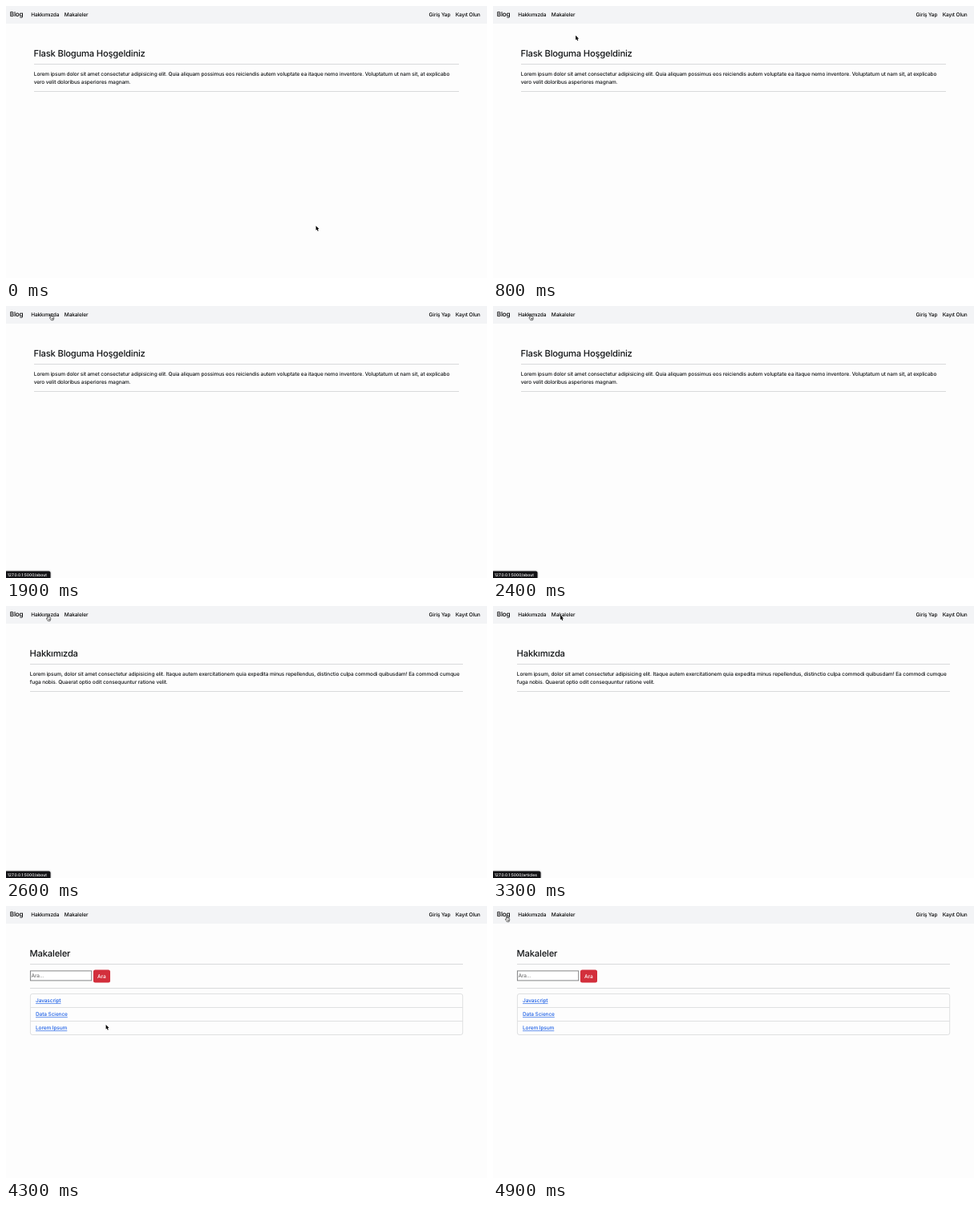
Recreate the animation shown at these times as an HTML page. Size 600 px wide and 339 px high, loop 5 s.

```html
<!DOCTYPE html>
<html lang="tr">
<head>
<meta charset="utf-8">
<title>Flask Blog</title>
<style>
  html, body { margin: 0; width: 100%; height: 100%; overflow: hidden; background: #fdfdfd; }
  svg { display: block; width: 600px; height: 339px; }
  text {
    font: 500 6.5px Inter, "Open Sans", sans-serif; letter-spacing: -.0143em;
    text-rendering: geometricPrecision; fill: #050506; white-space: pre;
  }
  .brand { font-size: 8.1px; letter-spacing: -.02em; }
  .title { font-size: 11.2px; letter-spacing: -.0171em; fill: #121416; }
  .body { fill: #121416; }
  .link { fill: #1a5ee6; text-decoration: underline; }
  .hint { fill: #757575; }
  .light { fill: #fff; }
  .rule { stroke: #d9dadb; }
  .frame { fill: none; stroke: #dfe0e1; }
  .status text { font-size: 5px; letter-spacing: 0; fill: #fff; }
  .status path { fill: #111114; filter: drop-shadow(0 0 1px #0006); }

  .page, .status { visibility: hidden; animation: 5s step-end infinite; }
  #home { animation-name: home; }
  #about { animation-name: about; }
  #articles { animation-name: articles; }
  #urlHome { animation-name: urlHome; }
  #urlAbout { animation-name: urlAbout; }
  #urlArticles { animation-name: urlArticles; }
  @keyframes home { 0% { visibility: visible } 52%, 100% { visibility: hidden } }
  @keyframes about { 52% { visibility: visible } 68%, 100% { visibility: hidden } }
  @keyframes articles { 68%, 100% { visibility: visible } }
  @keyframes urlHome { 32% { visibility: visible } 36%, 100% { visibility: hidden } }
  @keyframes urlAbout { 36% { visibility: visible } 58%, 100% { visibility: hidden } }
  @keyframes urlArticles { 58% { visibility: visible } 82%, 100% { visibility: hidden } }
</style>
</head>
<body>
<svg viewBox="0 0 600 339">
  <rect width="600" height="339" fill="#fdfdfd"/>
  <rect width="600" height="22" fill="#f3f4f6"/>
  <text class="brand" x="4.8" y="13.2">Blog</text>
  <text x="31.2" y="12.6">Hakkımızda</text>
  <text x="72.8" y="12.6">Makaleler</text>
  <text x="527.6" y="12.6">Giriş Yap</text>
  <text x="560.7" y="12.6">Kayıt Olun</text>

  <g class="page" id="home">
    <text class="title" x="34.6" y="63.2">Flask Bloguma Hoşgeldiniz</text>
    <path class="rule" d="M35 72.5H565M35 106.5H565"/>
    <text class="body" x="34.8" y="87">Lorem ipsum dolor sit amet consectetur adipisicing elit. Quia aliquam possimus eos reiciendis autem voluptate ea itaque nemo inventore. Voluptatum ut nam sit, at explicabo</text>
    <text class="body" x="34.8" y="97">vero velit doloribus asperiores magnam.</text>
  </g>

  <g class="page" id="about">
    <text class="title" x="29.6" y="63.2">Hakkımızda</text>
    <path class="rule" d="M30 72.5H570M30 106.5H570"/>
    <text class="body" x="29.8" y="87">Lorem ipsum, dolor sit amet consectetur adipisicing elit. Itaque autem exercitationem quia expedita minus repellendus, distinctio culpa commodi quibusdam! Ea commodi cumque</text>
    <text class="body" x="29.8" y="97">fuga nobis. Quaerat optio odit consequuntur ratione velit.</text>
  </g>

  <g class="page" id="articles">
    <text class="title" x="29.6" y="63.2">Makaleler</text>
    <path class="rule" d="M30 72.5H570M30 102.5H570"/>
    <rect x="30.4" y="80.9" width="76.3" height="12" fill="#fff" stroke="#77787a" stroke-width=".9"/>
    <text class="hint" x="31.4" y="89.4">Ara...</text>
    <rect x="108.9" y="79.6" width="21.1" height="15.8" rx="2.5" fill="#d32f3c"/>
    <text class="light" x="114" y="89.8">Ara</text>
    <rect class="frame" x="30.4" y="109.5" width="539.3" height="51" rx="2.5"/>
    <path class="frame" d="M30 126.5H570M30 143.5H570"/>
    <text class="link" x="37" y="120.4">Javascript</text>
    <text class="link" x="37" y="137.4">Data Science</text>
    <text class="link" x="37" y="154.4">Lorem Ipsum</text>
  </g>

  <g class="status" id="urlHome">
    <path d="M0 330.5H37.5Q39.5 330.5 39.5 332.5V339H0Z"/>
    <text x="1.8" y="336.7">127.0.0.1:5000</text>
  </g>
  <g class="status" id="urlAbout">
    <path d="M0 330.5H53.5Q55.5 330.5 55.5 332.5V339H0Z"/>
    <text x="1.8" y="336.7">127.0.0.1:5000/about</text>
  </g>
  <g class="status" id="urlArticles">
    <path d="M0 330.5H57.5Q59.5 330.5 59.5 332.5V339H0Z"/>
    <text x="1.8" y="336.7">127.0.0.1:5000/articles</text>
  </g>

  <g id="cursor">
    <path id="arrow" d="M-.4 .1V5.6L.8 4.5L1.7 6.6L2.8 6.2L1.9 4.1H3.6Z" fill="#000" stroke="#fff" stroke-width=".4" paint-order="stroke"/>
    <path id="hand" d="M1.6 4.6V1Q1.6 .3 2.1 .3T2.7 1V3Q3.3 2.6 3.7 3.2Q4.3 2.8 4.7 3.4Q5.7 3.1 5.7 4.2V5.6Q5.6 6.6 5 7.7H2.3Q1.7 6.5 .5 5Q.2 4.2 1 4.2ZM3.1 5V6.5M4 5V6.5M4.8 5V6.5"
      fill="#fff" stroke="#000" stroke-width=".55" stroke-linejoin="round"/>
  </g>
</svg>
<script>
  const LOOP = 5000, STEP = 100;
  // time, x, y, pointer shape from that time on
  const stops = [
    [0, 387, 274, 'arrow'], [300, 277, 118, 'arrow'], [500, 277, 118, 'arrow'],
    [1000, 36, 5, 'arrow'], [1100, 25, 8, 'arrow'], [1200, 19, 9, 'hand'],
    [1400, 16.5, 9.8, 'hand'], [1600, 18, 10, 'hand'], [1700, 34, 9, 'hand'],
    [1900, 54, 10, 'hand'], [2000, 55.5, 10, 'hand'], [2300, 31.5, 8.5, 'hand'],
    [2400, 44.5, 10, 'hand'], [2500, 44.5, 10, 'hand'], [2600, 50, 11, 'hand'],
    [3100, 81.5, 11.5, 'hand'], [3200, 81.5, 11.5, 'hand'], [3300, 84.5, 11.5, 'arrow'],
    [3500, 82, 12, 'hand'], [3700, 82, 12, 'hand'], [3800, 82, 16, 'hand'],
    [3900, 88, 34, 'arrow'], [4300, 125, 148, 'arrow'], [4800, 16, 14, 'hand'],
    [4900, 15, 12, 'hand'], [5000, 15, 12, 'hand']
  ];
  const get = id => document.getElementById(id);
  const cursor = get('cursor'), shapes = { arrow: get('arrow'), hand: get('hand') };
  const ease = k => k * (1.5 - k / 2);

  function draw(now) {
    const t = Math.floor(now % LOOP / STEP) * STEP;
    const i = stops.findIndex((s, n) => n && t < s[0]);
    const [t0, x0, y0, kind] = stops[i - 1], [t1, x1, y1] = stops[i];
    const k = ease((t - t0) / (t1 - t0));
    cursor.setAttribute('transform', `translate(${x0 + (x1 - x0) * k} ${y0 + (y1 - y0) * k})`);
    for (const name in shapes) shapes[name].style.display = name === kind ? '' : 'none';
  }

  const start = performance.now();
  document.getAnimations().forEach(a => { a.startTime = start; });
  function tick() {
    draw(Math.max(0, performance.now() - start));
    requestAnimationFrame(tick);
  }
  tick();
</script>
</body>
</html>
```
